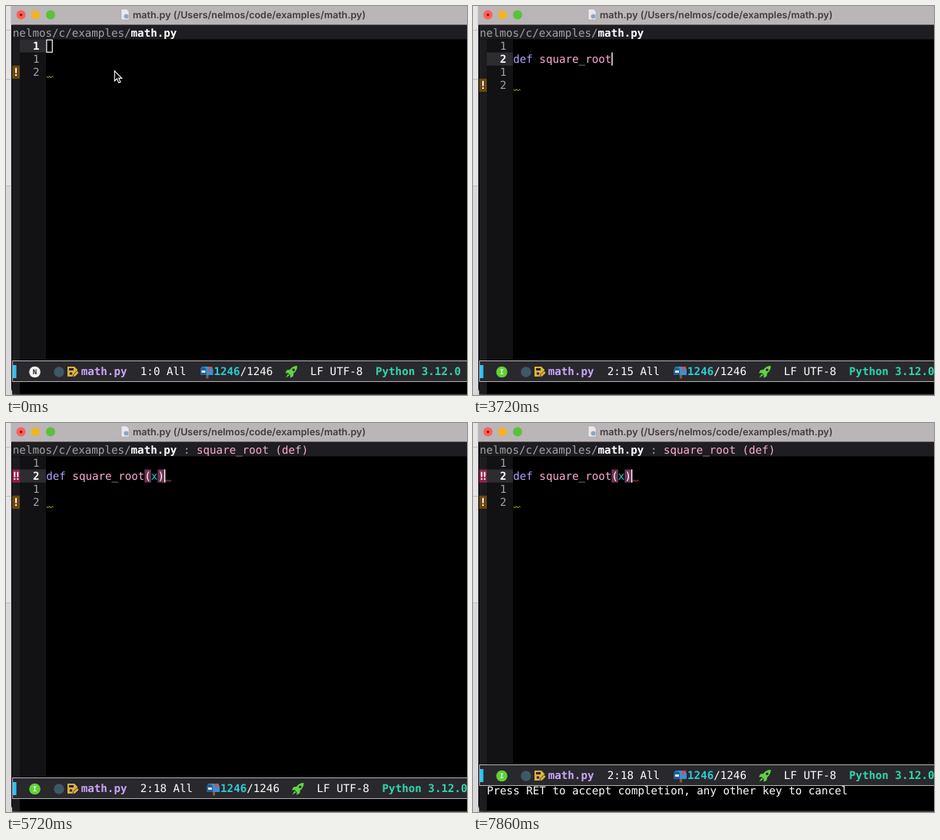
Recreate the animation shown at these times as an HTML page. Size 600 by 507 pixels, loop 8000 ms.

```html
<!DOCTYPE html>
<html lang="en">
<head>
<meta charset="utf-8">
<title>Editor session</title>
<style>
  html, body { margin: 0; width: 100%; height: 100%; overflow: hidden; background: #000; }
  svg { display: block; width: 100vw; height: 100vh; }
  text {
    font: 14.19px "DejaVu Sans Mono", monospace;
    white-space: pre; text-rendering: geometricPrecision; fill: #fff;
  }
  .bold { font-weight: 700; }
  .state { font-size: 9px; font-weight: 700; text-anchor: middle; }
  .mark { font-weight: 700; text-anchor: middle; }
  .title { font: 600 12.54px Inter, sans-serif; }
</style>
</head>
<body>
<svg id="stage" viewBox="0 0 600 507" preserveAspectRatio="none"></svg>
<script>
const LOOP = 8000;
const CHAR = 8.543, ROW = 17.1, LEFT = 18, CODE_X = LEFT + 4 * CHAR, CODE_Y = 43.4;
const LAST_BASELINE = 501.3;
const COLOR = {
  gray: '#a3a1a5', keyword: '#b6a0ff', name: '#feacd0', variable: '#00d3d0',
  doc: '#b0d6f5', key: '#2fafff', prompt: '#6ae4b9', warn: '#d8d02c', error: '#f0506e',
  title: '#403b3e', fringe: '#1c1b1e', warnMark: '#6b480c', errorMark: '#94204a'
};

// Moment at which each character of the definition appears.
const KEY_TIMES = [1720, 1860, 2000, 2150, 2570, 2710, 2860, 3000, 3140, 3140,
  3290, 3430, 3570, 3570, 3720, 3860, 4000, 4150];
const TIMES = {
  insert: 860, newline: 1430, parens: 4430, lint: 4860, message: 5140,
  syntax: 5720, menu: 6000, menuEnd: 7000, accept: 7430, parensAgain: 7570
};
const DEFINITION = [['def ', COLOR.keyword], ['square_root', COLOR.name],
  ['(', '#fff'], ['x', COLOR.variable], [')', '#fff']];
const COMMANDS = [
  ['gpt-pilot-complete-at-point', 'Get completion suggestions'],
  ['gpt-pilot-chat', 'Start a GPT chat session.'],
  ['gpt-pilot-clear-command-history', 'Clear the ‘gpt-pilot-command'],
  ['gpt-pilot-clear-project-file-context', 'Clear the list of project f'],
  ['describe-face', 'Display the properties of f'],
  ['font-lock-update', 'Update the syntax highlighti', '(C-x x f)'],
  ['gpt-pilot-chat-toggle-prefix', 'Toggle the visibility of th'],
  ['gpt-pilot-select-project-files', 'Prompt user to select files'],
  ['gpt-select-project-files', 'Prompt user to select files'],
  ['format-all-buffer', 'Auto-format the source code']
];

const rect = (x, y, w, h, fill, extra = '') =>
  `<rect x="${x}" y="${y}" width="${w}" height="${h}" fill="${fill}" ${extra}/>`;
const circle = (x, y, r, fill) => `<circle cx="${x}" cy="${y}" r="${r}" fill="${fill}"/>`;
const path = (d, fill, extra = '') => `<path d="${d}" fill="${fill}" ${extra}/>`;
const text = (x, y, content, fill = '#fff', cls = '', extra = '') =>
  `<text x="${x}" y="${y}" class="${cls}" style="fill:${fill}" ${extra}>${content}</text>`;
const bold = (x, y, content, fill) => text(x, y, content, fill, 'bold');
const rowTop = row => CODE_Y + row * ROW;
const baseline = row => rowTop(row) + 13.3;
const hollowCursor = (x, y) =>
  rect(x + .7, y + .8, 7.4, 16, 'none', 'stroke="#fff" stroke-width="1.2"');

function squiggle(x, row, color) {
  const y = rowTop(row) + 14.1;
  return path(`M${x} ${y}l1.6 1.7 2-1.9 2 1.9 2-1.9 1 1`, 'none', `stroke="${color}" stroke-width="1"`);
}

function fringeMark(row, sign, fill) {
  const squeeze = sign.length > 1 ? 'letter-spacing="-4.5" dx="-2"' : '';
  return rect(8, rowTop(row), 10, ROW, fill) + text(13, baseline(row), sign, '#fff', 'mark', squeeze);
}

function titleBar(menuOpen) {
  const y = 15.7;
  const lights = circle(19.5, 11.6, 6, '#fe5f57') + circle(38.5, 11.6, 6, '#efb32d') +
    circle(58, 11.6, 6, '#5ac23a');
  const label = menuOpen
    ? text(268, y, '*Minibuf-1* ()', COLOR.title, 'title')
    : circle(19.5, 11.6, 1.8, '#8a1a16') +
      path('M150 4h7l3 3v11h-10z', '#e9e8ec', 'stroke="#a8a4aa" stroke-width=".6"') +
      circle(156.5, 13.5, 3, '#8fa5c4') +
      text(165, y, 'math.py (/Users/nelmos/code/examples/math.py)', COLOR.title, 'title');
  return rect(7, 0, 593, 24.7, '#bab5b7') + lights + label;
}

function breadcrumb(showDefinition) {
  const x = 8.8, y = 39.5;
  return rect(8, 24.7, 592, 18.7, '#1e1d21') +
    text(x, y, 'nelmos/c/examples/', COLOR.gray) + bold(x + 18 * CHAR, y, 'math.py') +
    (showDefinition
      ? text(x + 26 * CHAR, y, ':', COLOR.gray) + text(x + 28 * CHAR, y, 'square_root (def)', COLOR.name)
      : '');
}

function definition(column) {
  let start = 0, out = '';
  for (const [word, color] of DEFINITION) {
    const part = word.slice(0, Math.max(0, column - start));
    if (part) out += text(CODE_X + start * CHAR, baseline(1), part, column < 3 ? '#fff' : color);
    start += word.length;
  }
  return out;
}

function buffer(s) {
  const current = s.line - 1;
  const numbers = s.line === 1 ? [1, 1, 2] : [1, 2, 1, 2];
  const last = numbers.length - 1;
  let out = rect(8, 43.4, 10, 462, COLOR.fringe) + rect(18, 43.4, 34, 420, '#121114') +
    rect(18, rowTop(current), 34, ROW, '#2d2c31');
  numbers.forEach((n, row) => {
    const active = row === current;
    out += text(LEFT + 2 * CHAR, baseline(row), n, active ? '#fff' : COLOR.gray, active ? 'bold' : '');
  });
  if (s.parens)
    for (const column of [15, 17])
      out += rect(CODE_X + column * CHAR, rowTop(1), CHAR, ROW, '#6f3355');
  out += definition(s.column);

  const end = CODE_X + 18 * CHAR + 1;
  if (s.syntax) out += fringeMark(1, '!!', COLOR.errorMark) + squiggle(end, 1, COLOR.error);
  const [warnRow, warnX] = s.lint && !s.syntax ? [1, end] : [last, CODE_X + .7];
  out += fringeMark(warnRow, '!', COLOR.warnMark) + squiggle(warnX, warnRow, COLOR.warn);

  const cursorX = CODE_X + s.column * CHAR;
  return out + (s.insert
    ? rect(cursorX, rowTop(current), 1.4, ROW, '#fff')
    : hollowCursor(cursorX, rowTop(current)));
}

const fileIcon =
  path('M80 470h9l4 4v3l-6 6h-7z', '#dcb13f') + rect(82, 472, 6, 3, '#28272c') +
  circle(84.5, 479, 1.8, '#28272c') +
  path('M87 483.5l.6-3 5-5 2.4 2.4-5 5z', '#dcb13f', 'stroke="#28272c" stroke-width=".8"');
const mailbox =
  rect(260.5, 480, 3, 5.5, '#8b5a3c') +
  path('M253 481v-6q0-5 4-5h8q4.500 0 4.500 5v6z', '#3f8fce') +
  path('M253 481v-6q0-4 3.800-4t3.800 4v6z', '#235f93') +
  rect(254.5, 475, 5, 3, '#dfeaf2') + rect(264, 470, 1.4, 6, '#e34646') + rect(264, 470, 4.5, 2.6, '#e34646');
const rocket =
  path('M379 469q-6 0-9.500 5l-4 .5-2 4 3.500-.3 3 3-.3 3.500 4-2 .6-4q5-3.700 4.700-9.700z', '#62d343') +
  circle(374.3, 474.3, 1.7, '#28272c') + path('M367 479.500l-3 5 5-3z', '#62d343');

function modeLine(s, rows) {
  const y = 481.2, position = `${s.line}:${s.column}`;
  const lift = Math.round((rows - 1) * ROW);
  const shift = (position.length - 3) * CHAR;
  const state = s.insert
    ? circle(37.5, 477, 7.3, '#5fd236') + text(37.5, 480.4, 'I', '#e8ffe0', 'state')
    : circle(37.5, 477, 7.3, '#f4f4f4') + text(37.5, 480.4, 'N', '#222', 'state');
  return `<g transform="translate(0 ${-lift})">` +
    rect(18, 461, 582, 44.5, '#000') +
    rect(8.5, 462.5, 596, 27, '#29282d', 'stroke="#b4b2b6"') +
    rect(9, 468, 4.5, 17, '#2fc3f5') + state +
    circle(69, 477, 6.7, '#3d5964') + fileIcon +
    bold(97.7, y, 'math.py', '#caa6fc') + text(174.8, y, position + ' All') +
    `<g transform="translate(${shift} 0)">` + mailbox + bold(270.5, y, '1246', '#2accd4') +
    text(270.5 + 4 * CHAR, y, '/1246') + rocket +
    text(396, y, 'LF UTF-8') + bold(481, y, 'Python 3.12.0', '#2fd6ac') + '</g></g>';
}

function commandMenu() {
  const first = LAST_BASELINE - COMMANDS.length * ROW, top = first - 13.3;
  let out = rect(LEFT, top + 1.5, 582, 505.5 - top - 1.5, '#000') +
    text(LEFT, first, '1/9586 M-x', COLOR.prompt) + hollowCursor(LEFT + 11 * CHAR, top) +
    rect(LEFT, top + ROW, 582, ROW, '#2f2e34');
  COMMANDS.forEach(([command, doc, key], i) => {
    const y = first + (i + 1) * ROW, cls = i ? '' : 'bold';
    out += text(LEFT, y, command, '#fff', cls) + text(LEFT + 42 * CHAR, y, doc, COLOR.doc, cls);
    if (key) out += bold(LEFT + (command.length + 1) * CHAR, y, key, COLOR.key);
  });
  return out;
}

function stateAt(t) {
  const within = (from, to) => t >= from && t < to;
  const s = {
    insert: t >= TIMES.insert,
    line: t < TIMES.newline ? 1 : 2,
    column: KEY_TIMES.filter(k => t >= k).length,
    parens: within(TIMES.parens, TIMES.menu) || t >= TIMES.parensAgain,
    lint: t >= TIMES.lint,
    syntax: t >= TIMES.syntax,
    menu: within(TIMES.menu, TIMES.menuEnd),
    accept: t >= TIMES.accept,
    message: ''
  };
  if (within(TIMES.insert, TIMES.newline)) s.message = '-- INSERT --';
  if (within(TIMES.message, TIMES.syntax)) s.message = 'pycodestyle [W391]: W391 blank line at end of file';
  if (s.accept) s.message = 'Press RET to accept completion, any other key to cancel';
  return s;
}

function scene(s) {
  const rows = s.menu ? COMMANDS.length + 1 : s.accept ? 2 : 1;
  const desktop = rect(0, 0, 8, 507, '#e6e4e6') + rect(0, 234, 8, 273, '#dad8db') +
    [31, 95, 234].map(y => rect(0, y, 7, 1, '#c0bec1')).join('') +
    rect(6, 0, 1.5, 507, '#c4c2c5') + rect(8, 500, 592, 7, '#4a4346');
  const pointer = s.insert ? '' :
    path('M141.300 84.500v13.200l3.100-2.900 2.300 5.300 2.300-1-2.300-5h4.100z', '#000', 'stroke="#fff" stroke-width="1.1"');
  return desktop + rect(7, 0, 610, 505.5, '#000', 'rx="7"') + titleBar(s.menu) + breadcrumb(s.syntax) +
    buffer(s) + (s.menu ? commandMenu() : '') + modeLine(s, rows) +
    (s.menu ? commandMenu() : text(LEFT, LAST_BASELINE - (rows - 1) * ROW, s.message)) + pointer;
}

const stage = document.getElementById('stage');
let shown = '';
function draw() {
  const state = stateAt(performance.now() % LOOP);
  const key = JSON.stringify(state);
  if (key !== shown) {
    shown = key;
    stage.innerHTML = scene(state);
  }
  requestAnimationFrame(draw);
}
draw();
</script>
</body>
</html>
```
